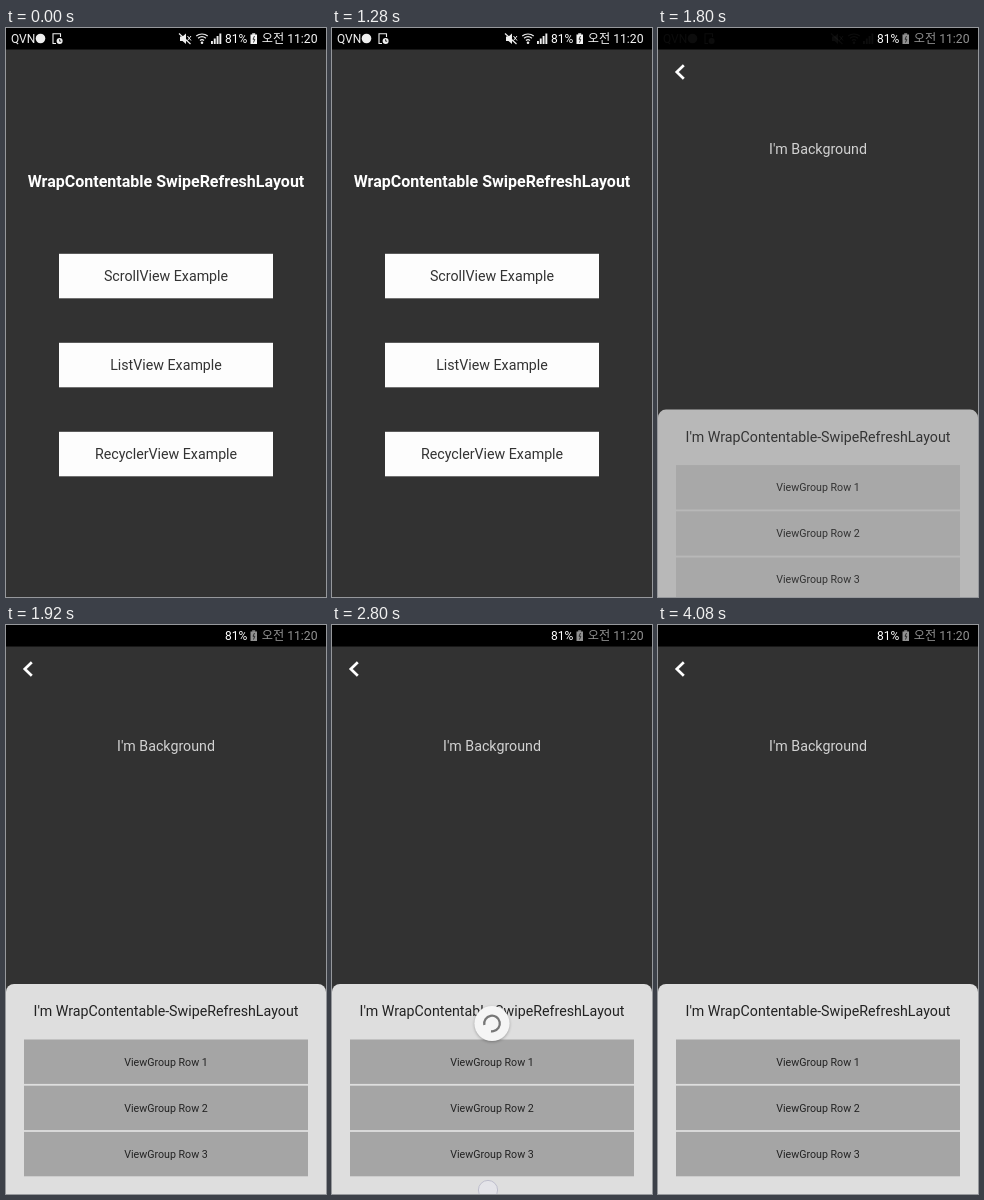
These frames come from a looping animation (320 px wide and 569 px high, 6.6 s). An HTML page with a canvas:

```html
<!DOCTYPE html>
<html lang="ko">
<head>
<meta charset="utf-8">
<title>Swipe refresh demo</title>
<style>
html, body { margin: 0; width: 100%; height: 100%; overflow: hidden; background: #323232; }
canvas { display: block; width: 100vw; height: 100vh; }
</style>
</head>
<body>
<canvas id="stage"></canvas>
<script>
const W = 320, H = 569, LOOP = 6600;
const FONT = 'Roboto, "Noto Sans CJK KR", "Noto Sans CJK", sans-serif';
const SHEET_Y = 359, REST_Y = 398.5;
const canvas = document.getElementById('stage');
const ctx = canvas.getContext('2d');
const ratio = window.devicePixelRatio || 1;
canvas.width = W * ratio;
canvas.height = H * ratio;

const clamp = v => Math.min(1, Math.max(0, v));
const span = (t, a, b) => clamp((t - a) / (b - a));
const mix = (a, b, k) => a + (b - a) * k;
const smooth = k => k * k * (3 - 2 * k);
const easeOut = (k, p = 2) => 1 - (1 - k) ** p;

function text(str, x, y, size, color, align = 'center', weight = 400) {
  ctx.font = `${weight} ${size}px ${FONT}`;
  ctx.textAlign = align;
  ctx.textBaseline = 'alphabetic';
  ctx.fillStyle = color;
  ctx.fillText(str, x, y);
}

function rect(x, y, w, h, color) {
  ctx.fillStyle = color;
  ctx.fillRect(x, y, w, h);
}

function disc(x, y, r, color) {
  ctx.fillStyle = color;
  ctx.beginPath();
  ctx.arc(x, y, r, 0, Math.PI * 2);
  ctx.fill();
}

function line(points, width, color, closed) {
  ctx.beginPath();
  points.forEach(([x, y]) => ctx.lineTo(x, y));
  if (closed) ctx.closePath();
  ctx.lineWidth = width;
  ctx.strokeStyle = color;
  ctx.stroke();
}

function layer(alpha, draw) {
  if (alpha <= 0) return;
  ctx.save();
  ctx.globalAlpha *= alpha;
  draw();
  ctx.restore();
}

function notices() {
  const c = '#eee';
  text('QVN', 5, 14.5, 12, c, 'left');
  disc(34.5, 10.5, 4.8, c);
  // Page with a clock
  line([[54.5, 9], [54.5, 5.7], [47, 5.7], [47, 15.5], [50, 15.5]], 1.1, c);
  disc(53.6, 13, 3, c);
  line([[53.6, 11.3], [53.6, 13.2], [55.2, 13.2]], 0.8, '#000');
  // Muted speaker
  ctx.fillStyle = c;
  ctx.beginPath();
  [[174, 8.5], [176.5, 8.5], [180, 5.5], [180, 16], [176.5, 13], [174, 13]].forEach(([x, y]) => ctx.lineTo(x, y));
  ctx.fill();
  line([[173, 5.5], [184.5, 16]], 1.2, c);
  line([[181.5, 8], [185, 12.5]], 1, c);
  line([[185, 8], [181.5, 12.5]], 1, c);
  // Wi-Fi
  [3.2, 6.2, 9].forEach(r => {
    ctx.beginPath();
    ctx.arc(196, 15, r, -Math.PI * 0.72, -Math.PI * 0.28);
    ctx.lineWidth = 1.2;
    ctx.strokeStyle = c;
    ctx.stroke();
  });
  disc(196, 14.8, 1.3, c);
  for (let i = 0; i < 4; i++) rect(205 + i * 2.8, 13 - i * 2.5, 1.9, 3 + i * 2.5, c);
}

function statusBar(t) {
  rect(0, 0, W, 21.5, '#000');
  const k = span(t, 1480, 1700);
  layer(1 - 0.82 * k - 0.18 * span(t, 1700, 1840), notices);
  text('81%', 219, 14.8, 12, '#fff', 'left');
  const grey = Math.round(mix(245, 145, k));
  const c = `rgb(${grey},${grey},${grey})`;
  rect(244.5, 6.5, 6.5, 9.5, c);
  rect(246.2, 5.3, 3, 1.5, c);
  line([[248.5, 8], [247, 11.3], [248.8, 11.3], [247.5, 14.5]], 0.9, '#222');
  text('오전 11:20', 311.5, 14.8, 12.2, c, 'right');
}

function home() {
  rect(0, 21.5, W, H - 21.5, '#323232');
  text('WrapContentable SwipeRefreshLayout', 160, 158.7, 16, '#fff', 'center', 700);
  ['ScrollView', 'ListView', 'RecyclerView'].forEach((name, i) => {
    const y = 225.8 + i * 89;
    rect(53, y, 214, 44.5, '#fdfdfd');
    text(name + ' Example', 160, y + 27.5, 14.22, '#333');
  });
}

function touch(x, y, alpha = 1) {
  layer(alpha, () => {
    disc(x, y, 10, 'rgba(232,232,240,0.62)');
    ctx.beginPath();
    ctx.arc(x, y, 9.6, 0, Math.PI * 2);
    ctx.lineWidth = 1;
    ctx.strokeStyle = 'rgba(165,165,185,0.6)';
    ctx.stroke();
  });
}

function detail() {
  rect(0, 21.5, W, H - 21.5, '#323232');
  line([[25.8, 37.2], [18.8, 44], [25.8, 50.8]], 2.7, '#fff');
  text("I'm Background", 160, 125.5, 14.22, '#d2d2d2');
}

function sheet(t) {
  if (t < 1676) return;
  const k = easeOut(span(t, 1676, 1920), 2.13);
  const y = SHEET_Y + (1 - k) * 102.4;
  const labels = Math.sqrt(k);
  layer(k, () => {
    ctx.fillStyle = '#dedede';
    ctx.beginPath();
    ctx.roundRect(0, y, W, H, 8);
    ctx.fill();
  });
  layer(labels, () => text("I'm WrapContentable-SwipeRefreshLayout", 160, y + 32.3, 14.22, '#222'));
  for (let i = 0; i < 3; i++) {
    const top = y + 55.5 + i * 46.2;
    layer(k, () => rect(18, top, 284, 44.4, '#a5a5a5'));
    layer(labels, () => text('ViewGroup Row ' + (i + 1), 160, top + 26, 10.67, '#222'));
  }
}

// Arc in turns: pulled open, then shrinking and growing while it spins
function arcAt(t) {
  if (t < 2800) {
    const pull = smooth(span(t, 2440, 2640));
    return { from: mix(-0.1, 0.47, pull), size: 0.8 * clamp((pull - 0.25) / 0.6), tone: pull > 0.85 ? 1 : 0.35 };
  }
  const spin = (t - 2800) / 1332;
  const tail = 0.76 * smooth(span(t, 2800, 3466));
  const head = 0.8 + 0.8 * smooth(span(t, 3466, 4132));
  return { from: 0.47 + spin * 0.85 + tail, size: head - tail, tone: 1 };
}

function spinner(t) {
  if (t < 2420 || t >= 4070) return;
  const pulled = mix(341, 408, smooth(span(t, 2420, 2640)));
  const y = t < 2680 ? pulled : mix(408, REST_Y, easeOut(span(t, 2680, 2800)));
  const scale = 1 - span(t, 3910, 4070);
  const { from, size, tone } = arcAt(t);
  ctx.save();
  ctx.beginPath();
  ctx.rect(0, SHEET_Y, W, H - SHEET_Y);
  ctx.clip();
  ctx.translate(160, y);
  ctx.scale(scale, scale);
  ctx.shadowColor = 'rgba(0,0,0,0.28)';
  ctx.shadowBlur = 3 * ratio;
  ctx.shadowOffsetY = ratio;
  disc(0, 0, 17.6, '#f5f5f5');
  ctx.shadowColor = 'transparent';
  ctx.globalAlpha = tone;
  ctx.beginPath();
  ctx.arc(0, 0, 7.8, from * Math.PI * 2, (from + size) * Math.PI * 2);
  ctx.lineWidth = 2.3;
  ctx.strokeStyle = '#777';
  if (size > 0.01) ctx.stroke();
  ctx.restore();
}

function draw(t) {
  ctx.setTransform(ratio, 0, 0, ratio, 0, 0);
  ctx.clearRect(0, 0, W, H);
  if (t < 1640) home();
  if (t >= 1000 && t < 1120) touch(158, 247);
  layer(smooth(span(t, 1400, 1640)), detail);
  sheet(t);
  spinner(t);
  if (t >= 2400 && t < 2880) touch(156, mix(444, 565, smooth(span(t, 2400, 2640))));
  statusBar(t);
}

const start = performance.now();
function tick() {
  const t = (performance.now() - start) % LOOP;
  draw(Math.floor(t / 40) * 40);
  requestAnimationFrame(tick);
}
tick();
</script>
</body>
</html>
```
